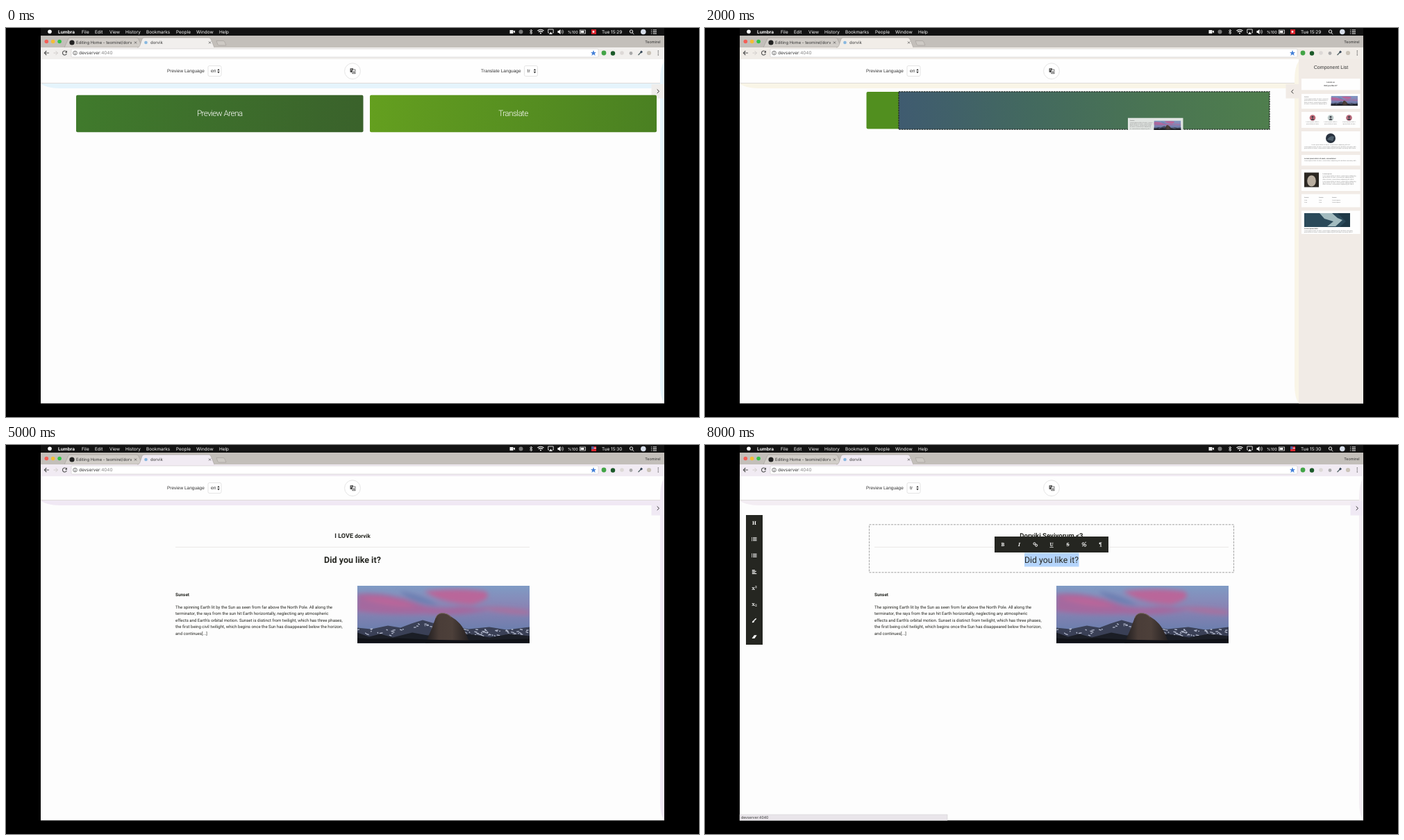
Animation of 998x561 px, one loop 9 s. Source, as an HTML page:

```html
<!DOCTYPE html>
<html lang="en">
<head>
<meta charset="utf-8">
<title>Page builder demo</title>
<style>
  html, body { margin: 0; height: 100%; overflow: hidden; background: #000; }
  svg { display: block; width: 100vw; height: 100vh; }
  text { font-family: "Liberation Sans", Arial, sans-serif; text-rendering: geometricPrecision; white-space: pre; }
  .ui { font-family: Inter, sans-serif; }
  .doc { font-family: Roboto, sans-serif; }
  .thin { font-family: Roboto, sans-serif; font-weight: 300; letter-spacing: -.6px; }
  .icon { font-family: "Noto Serif", serif; font-weight: 700; }
  .mid { text-anchor: middle; }
  .b { font-weight: 700; }
</style>
</head>
<body>
<svg id="stage" viewBox="0 0 998 561" preserveAspectRatio="none">
  <defs>
    <linearGradient id="forest"><stop stop-color="#407a2c"/><stop offset="1" stop-color="#3a622b"/></linearGradient>
    <linearGradient id="lime"><stop stop-color="#649f1f"/><stop offset="1" stop-color="#4a8022"/></linearGradient>
    <linearGradient id="arena"><stop stop-color="#54931f"/><stop offset="1" stop-color="#3d6b2a"/></linearGradient>
    <linearGradient id="drop"><stop stop-color="#3f5b70"/><stop offset=".35" stop-color="#43695f"/><stop offset=".7" stop-color="#4a7552"/><stop offset="1" stop-color="#4f7e4d"/></linearGradient>
    <linearGradient id="sky" x2="0" y2="1"><stop stop-color="#7f9bc4"/><stop offset=".4" stop-color="#8a82b3"/><stop offset=".75" stop-color="#6d7fae"/></linearGradient>
    <linearGradient id="dome"><stop stop-color="#1d1b1d"/><stop offset=".3" stop-color="#4a3d38"/><stop offset=".6" stop-color="#4d403a"/><stop offset="1" stop-color="#231f20"/></linearGradient>
    <filter id="soft"><feGaussianBlur stdDeviation="3"/></filter>
    <symbol id="photo" viewBox="0 0 248 82" preserveAspectRatio="none">
      <path fill="url(#sky)" d="M0 0H248V82H0Z"/>
      <g filter="url(#soft)">
        <path fill="#a4699f" d="M0 12Q40 8 84 24Q110 36 150 30L190 34Q150 44 96 40Q40 42 0 36Z"/>
        <path fill="#b9669a" d="M4 17Q40 12 86 29Q50 33 4 17ZM96 8Q145 2 184 8Q198 18 165 27Q120 25 96 8Z"/>
        <path fill="#a8719f" d="M176 31Q215 30 248 36V41Q205 41 176 31Z"/>
        <path fill="#6c7fb2" d="M60 8Q92 12 118 29Q82 27 60 8Z"/>
      </g>
      <path fill="#3a4056" d="M0 60L20 62 44 57 62 60 78 54 94 49 108 53 160 62 190 59 215 63 248 59V82H0Z"/>
      <g id="snow" fill="none" stroke="#b4bace" stroke-width="1.3"></g>
      <path fill="#1b1e26" d="M0 67L17 73 33 69 51 74 79 67 101 71 161 69 191 74 219 69 248 72V82H0Z"/>
      <path fill="url(#dome)" d="M98 82L106 64 112 48Q114 40 121 39Q129 38 136 45Q150 53 156 68L162 82Z"/>
      <path fill="none" stroke="#85756b" stroke-width=".8" d="M113 46Q115 40 121 39.4Q129 38.6 135 45"/>
      <path fill="#101217" d="M0 75Q32 77 58 75L105 77 160 78 248 76V82H0Z"/>
    </symbol>
  </defs>
  <g id="scene"></g>
</svg>
<script>
const BRAND = 'dorvik', USER = 'Teomirel', HOST = 'devserver', PORT = ':4040';
const INK = '#252621', BOTTOM = 541.4;
const TITLE = `<tspan font-size="9.1">I LOVE </tspan><tspan font-size="8">${BRAND}</tspan>`;
const TITLE_TR = '<tspan font-size="9.6">Dorviki Seviyorum &lt;3</tspan>';
const WIDE = ['The spinning Earth lit by the Sun as seen from far above the North Pole. All along the',
  'terminator, the rays from the sun hit Earth horizontally, neglecting any atmospheric',
  "effects and Earth's orbital motion. Sunset is distinct from twilight, which has three phases,",
  'the first being civil twilight, which begins once the Sun has disappeared below the horizon,',
  'and continues[...]'];
const NARROW = ['The spinning Earth lit by the Sun as seen from far above the North',
  'Pole. All along the terminator, the rays from the sun hit Earth',
  "horizontally, neglecting any atmospheric effects and Earth's orbital",
  'motion. Sunset is distinct from twilight, which has three phases, the',
  'first being civil twilight, which begins once the Sun has disappeared',
  'below the horizon, and continues[...]'];

const rect = (x, y, w, h, fill, more = '') => `<rect x="${x}" y="${y}" width="${w}" height="${h}" fill="${fill}" ${more}/>`;
const dot = (x, y, r, fill, more = '') => `<circle cx="${x}" cy="${y}" r="${r}" fill="${fill}" ${more}/>`;
const text = (x, y, size, str, cls = '', fill = '#333', more = '') =>
  `<text x="${x}" y="${y}" font-size="${size}" class="${cls}" fill="${fill}" ${more}>${str}</text>`;
const line = (d, color, w = 1, more = '') => `<path d="${d}" fill="none" stroke="${color}" stroke-width="${w}" ${more}/>`;
const shape = (d, fill) => `<path d="${d}" fill="${fill}"/>`;
const photo = (x, y, w, h) => `<use href="#photo" x="${x}" y="${y}" width="${w}" height="${h}"/>`;

function menuBar(late) {
  const items = [[109, 'File'], [128, 'Edit'], [149, 'View'], [172, 'History'], [202, 'Bookmarks'],
    [245, 'People'], [274, 'Window'], [307, 'Help']];
  return rect(50, 0, 898, 11, '#131313') + dot(63, 5.3, 2.8, '#fff') +
    text(75, 7.7, 6.5, 'Lumbra', 'ui b', '#fff') +
    items.map(([x, s]) => text(x, 7.7, 6.45, s, 'ui', '#fff')).join('') +
    rect(725.5, 3, 5, 5, '#eee') + shape('M730 5L733 3.5V7.5Z', '#eee') +
    dot(741.5, 5.5, 3, '#777') +
    line('M754 3.5L758 7 756 9V2L758 4 754 7.5', '#eee', .8) +
    line('M765.5 4Q770 .5 774.5 4M767 5.8Q770 3.4 773 5.8', '#fff', 1.2) + dot(770, 7.6, 1, '#fff') +
    line('M782 7H780.8V2H788.2V7H787', '#eee', .9) + shape('M784.5 5.5L787 9H782Z', '#eee') +
    shape('M794.5 4H796L798.5 2V9L796 7H794.5Z', '#fff') + line('M800 3.5Q801.5 5.5 800 7.5M801.5 2.5Q804 5.5 801.5 8.5', '#eee', .7) +
    text(809, 7.5, 5.6, '%100', 'ui', '#fff') +
    rect(826.5, 3, 8, 5, 'none', 'stroke="#eee" stroke-width=".8"') + rect(827.5, 4, 5, 3, '#eee') +
    rect(843, 2, 7, 7, '#d8242e') + (late ? rect(843, 2, 3.5, 4, '#4b5f9b') + rect(846.5, 4, 3.5, 1, '#eee') : dot(846, 5.5, 1.4, '#fff')) +
    text(858, 7.7, 6.45, late ? 'Tue 15:30' : 'Tue 15:29', 'ui', '#fff') +
    dot(900.5, 5, 2.2, 'none', 'stroke="#fff" stroke-width=".9"') + line('M902 6.8L904.3 9', '#fff', .9) +
    dot(917.8, 5.5, 3.8, '#d5dce8') +
    line('M929 3H930M929 5.5H930M929 8H930M931.5 3H937M931.5 5.5H937M931.5 8H937', '#fff', 1);
}

function browser(s) {
  const close = x => line(`M${x - 1.5} 19.5l3 3m0 -3l-3 3`, '#555', .8);
  return rect(50, 11, 898, 18, '#c3bfba') +
    ['#f45f57', '#f4bd35', '#30c545'].map((c, i) => dot(58.3 + i * 9.4, 19.5, 2.8, c)).join('') +
    `<path d="M84 28L90 15Q91 14 92 14H188Q190 14 191 16L196 28Z" fill="#d2cec9" stroke="#a19d99" stroke-width=".6"/>` +
    `<path d="M303 18.5H313Q314 18.5 315 20L317 25H307Q305.5 25 305 24Z" fill="#cdc9c4" stroke="#a19d99" stroke-width=".6"/>` +
    rect(50, 28, 898, 17, s.bar) +
    `<path d="M189 28.2Q192 28 193 25L196 16Q197 14 199 14H292Q294 14 295 16L300 28.2" fill="${s.bar}" stroke="#a19d99" stroke-width=".5"/>` +
    dot(95, 21, 3.6, '#222') +
    `<svg x="101" y="14" width="80" height="14">${text(0, 9.2, 5.9, `Editing Home - ${USER.toLowerCase()}/${BRAND}`, 'ui')}</svg>` +
    close(186.5) + dot(201.5, 21, 2.3, '#88b8e0') + text(208, 23.2, 6, BRAND, 'ui') + close(293.5) +
    text(942.5, 22, 5.5, USER, 'ui', '#333', 'text-anchor="end"') +
    line('M62 36H55.5M58.3 33L55.3 36 58.3 39', '#555', 1.1) +
    line('M68.5 36H74.5M71.5 33L74.5 36 71.5 39', '#d0ccca', 1) +
    line('M87 34.4A3 3 0 1 0 87.3 37', '#555', 1.1) + shape('M88 32.5V35.8H84.8Z', '#555') +
    rect(94, 30, 759, 12, '#fff', 'rx="1.5" stroke="#cfcbc9" stroke-width=".6"') +
    dot(99.5, 36, 2.8, 'none', 'stroke="#555" stroke-width=".8"') + line('M99.5 34.2V34.9M99.5 35.5V37.8', '#555', .8) +
    text(105, 38.4, 6.4, `${HOST}<tspan fill="#888">${PORT}</tspan>`, 'ui') +
    shape('M846 32L847.2 35H850L847.8 36.8 848.7 40 846 38.1 843.3 40 844.2 36.8 842 35H844.8Z', '#4681d8') +
    dot(861, 36, 3.4, '#43a547') + dot(874, 36.5, 3.2, '#1c5a2a') + dot(887, 36, 2.8, '#ddd9d7') +
    dot(900, 36.5, 2.4, '#aaa') + line('M910.5 39L914.5 35', '#566', 1.4) + line('M914 33.5L916 35.5', '#345', 2.8) +
    dot(926, 36, 3.1, '#cbc4b9') + [33.3, 36, 38.7].map(y => dot(939.3, y, .8, '#555')).join('');
}

function select(x, label) {
  const a = x + 15;
  return rect(x, 54.5, 19, 15, '#fff', 'rx="2" stroke="#ddd" stroke-width=".8"') +
    text(x + 4, 64.4, 6.8, label) +
    shape(`M${a - 1.7} 61.3l1.7 -2.6 1.7 2.6ZM${a - 1.7} 62.8l1.7 2.6 1.7 -2.6Z`, '#333');
}

function header(s) {
  return rect(50, 45, 898, 34.5, '#fefefe') + rect(50, 79, 898, 1, '#dedbd9') +
    text(232, 64, 6.5, 'Preview Language') + select(291, s.lang || 'en') +
    (s.split ? text(684, 64, 6.5, 'Translate Language') + select(746.5, 'tr') : '') +
    dot(499, 62.2, 11.4, '#fff', 'stroke="#ddd" stroke-width=".8"') +
    rect(495.6, 58.3, 4.4, 5.4, '#333') + rect(498.8, 60, 4.2, 5.8, '#fff', 'stroke="#444" stroke-width=".7"') +
    text(499.4, 64.6, 4.2, 'A', 'b') + line('M496.4 60h2m-1 -.9v.9q0 1.4 -1 2.2', '#fff', .5);
}

function frameTint(s) {
  const r = s.panel ? 855 : 948, c = s.tint;
  return shape(`M50 80Q58 87 77 87H${r}V80Z`, c) +
    shape(`M${r} 48Q${r - 6} 56 ${r - 6} 76V515Q${r - 6} 533 ${r} 541Z`, c) +
    rect(r - 18.5, 81, 18.5, 20.5, s.side) +
    line(s.panel ? 'M847.3 89L844.5 91.7 847.3 94.5' : 'M937.7 88.5L940.5 91.3 937.7 94', '#333', 1);
}

const LOREM = 'Lorem ipsum dolor sit amet, consectetuer adipiscing elit sed diam nonummy nibh euismod tincidunt ut laoreet';
const tiny = (x, y, n, rows = 1, cls = '') => Array.from({length: rows}, (_, i) =>
  text(x, y + i * 2.3, 2.1, LOREM.slice(i * 6, i * 6 + n).trim(), cls, '#777')).join('');

function panel(s) {
  const cards = [[73, 16.5], [95, 21.5], [121, 23], [149, 29], [183, 15.5], [204, 31], [239.5, 19], [263.5, 33.5]];
  return rect(855, 45, 93, BOTTOM - 45, s.side) + text(901.5, 59.3, 7.1, 'Component List', 'mid') +
    cards.map(([y, h]) => rect(859, y, 84.5, h, '#fefefe')).join('') +
    text(901, 78.8, 2.6, 'Lorem us', 'mid b') + text(901, 84, 2.7, 'Did you like it?', 'mid b') +
    tiny(863, 100.3, 5, 1, 'b') + tiny(863, 103, 36, 4) + photo(901.5, 98, 38.5, 14) +
    [875, 901, 927.5].map((x, i) => dot(x, 129.5, 4.3, ['#bf6977', '#bccac9', '#b6697a'][i]) +
      dot(x, 128.3, 1.4, '#3e3f48') + shape(`M${x - 2.6} 132.8Q${x} 128 ${x + 2.6} 132.8Z`, '#3e3f48') +
      tiny(x, 136.3, 19, 2, 'mid')).join('') +
    dot(901, 159, 7, '#28323f') + shape('M896 161Q901 154 906 157L904 163Z', '#50606d') + tiny(901, 169, 60, 1, 'mid') + tiny(863, 171.5, 78, 2) +
    text(863, 188.8, 2.3, LOREM.slice(0, 40), 'b') + tiny(863, 191.8, 78) +
    rect(863, 208.5, 21, 21, '#2b2722') + '<ellipse cx="873.5" cy="220.5" rx="6.3" ry="8" fill="#b9aea0"/>' +
    tiny(889.5, 211, 12, 1, 'b') + tiny(889.5, 214, 51, 3) + tiny(889.5, 221.5, 51, 3) +
    [863, 884, 903].map(x => tiny(x, 245, 5, 1, 'b') + [248.5, 251.5].map(y => tiny(x, y, x > 900 ? 11 : 4)).join('')).join('') +
    rect(863, 267, 66, 20, '#2b4a5a') + shape('M885 267H903L911 274 918 277 908 286H896L905 279 892 275Z', '#a3bcc0') + shape('M911 267H929V287H914L923 279Z', '#1f3947') +
    text(863, 290, 2.2, LOREM.slice(0, 17), 'b') + tiny(863, 292.6, 74, 2);
}

const bar = (x, y, w, fill, label) => rect(x, y, w, 53.5, fill, 'rx="2"') +
  text(x + w / 2, y + 30.5, 11.8, label, 'thin mid', '#fff');

function article(x, w, y, lines, title, plain) {
  const c = x + w / 2, pw = w / 2 - 7;
  return text(c, 134 + y, 9, title, 'doc b mid', INK) + rect(x, 146.8 + y, w, .8, '#e3e1df') +
    (plain ? rect(460, 155.5, 78.5, 20, '#b4d4fb') : '') +
    text(c, 170.4 + y, plain ? 12.3 : 12.5, 'Did you like it?', 'doc mid' + (plain ? '' : ' b'), INK) +
    text(x, 218.2 + y, 6.4, 'Sunset', 'doc b', INK) +
    lines.map((s, i) => text(x, 236.1 + y + i * 9.35, 6.05, s, 'doc', INK)).join('') +
    photo(c + 7, 203 + y, pw, pw / 3);
}

const glyph = (x, y, s, more = '') => text(x, y + 2.5, 7.2, s, 'icon mid', '#fff', more);
const dashed = (x, y, w, h) => rect(x, y, w, h, 'none', 'stroke="#999" stroke-width=".9" stroke-dasharray="3 1.5"');

function inlineTools(x, y) {
  const at = i => x + 12 + i * 23.4, m = y + 11.5;
  const link = i => dot(at(i) - 1.4, m - 1.2, 1.5, 'none', 'stroke="#fff" stroke-width="1"') +
    dot(at(i) + 1.4, m + 1.2, 1.5, 'none', 'stroke="#fff" stroke-width="1"');
  return rect(x, y, 164, 23, INK) + glyph(at(0), m, 'B') + glyph(at(1), m, 'I', 'font-style="italic"') + link(2) +
    glyph(at(3), m, 'U', 'text-decoration="underline"') + glyph(at(4), m, 'S', 'text-decoration="line-through"') +
    link(5) + line(`M${at(5) - 3} ${m + 2.5}l2 -1m2 -4l2 -1`, '#fff', .8) + glyph(at(6), m, '¶');
}

function sideTools() {
  const y = i => 112.8 + i * 23.4;
  const rows = (i, d) => line(d.map((w, k) => `M69 ${y(i) - 2.4 + k * 2}h${w}`).join(''), '#fff', 1.1);
  const marks = i => line(`M67.5 ${y(i) - 3}v6`, '#fff', 1, 'stroke-dasharray="1.2 .8"');
  return rect(59, 101, 24, 187, INK) + glyph(71, y(0), 'H') +
    rows(1, [5.5, 5.5, 5.5]) + marks(1) + rows(2, [5.5, 5.5, 5.5]) + marks(2) +
    line(`M67.8 ${y(3) - 2.5}h4m-4 1.7h6m-6 1.7h4.5m-4.5 1.7h6.5`, '#fff', 1) +
    glyph(71, y(4), 'x²') + glyph(71, y(5), 'x₂') +
    line(`M70.5 ${y(6)}l3.2 -3`, '#fff', 1.5) + shape(`M67.8 ${y(6) + 3}q.5 -3.6 2.5 -3.3 2 1.4 -.4 3Z`, '#fff') +
    shape(`M67.5 ${y(7) + 2.3}l3.4 -4.6h3.8l-3.4 4.6Z`, '#fff');
}

const emptySplit = () => bar(101, 96.8, 413.5, 'url(#forest)', 'Preview Arena') + bar(524, 96.8, 413, 'url(#lime)', 'Translate');
const emptyArena = () => bar(232.5, 92, 533, 'url(#arena)', 'Preview Arena');

const dragging = () => rect(232.5, 92, 60, 53.5, '#518f1f', 'rx="2"') +
  rect(279, 91.8, 534, 54.4, 'url(#drop)', 'stroke="#252c28" stroke-width="1.3" stroke-dasharray="2.4 1.2"') +
  `<svg x="609" y="129.5" width="79.5" height="17.5">${rect(0, 0, 80, 18, '#e1e5e2')}` +
  `${tiny(3, 4, 5, 1, 'b')}${tiny(3, 7, 34, 5)}${photo(37.5, 4, 39, 13.5)}</svg>`;

const translating = () => article(113, 390, 4.6, NARROW, TITLE) + article(535, 390, 4.6, NARROW, TITLE_TR) +
  dashed(528.5, 119.8, 403.5, 69) + inlineTools(648, 104) + sideTools() +
  rect(506, 120, 19, 18.5, '#333430') + rect(513, 127, 4.6, 5, 'none', 'stroke="#fff" stroke-width=".9"') +
  line('M512 126h6.5M514.5 125h1.6M514.5 128v3M516.2 128v3', '#fff', .7) +
  line('M684 140.7H715', '#d65a50', 1, 'stroke-dasharray="1 1"') + line('M776.4 127.5V142', '#222', .8);

const popup = () => rect(282.5, 54, 30, 26.5, '#f5f3f5', 'rx="2.5" stroke="#bbb" stroke-width=".6"') +
  text(295, 64.4, 6.8, 'en') + line('M286 62.3l1.4 1.7 2.5 -3.8', '#333', .8) +
  rect(282.8, 68, 29.4, 10, '#3f86f2') + text(295, 75.3, 6.8, 'tr', '', '#fff');

const preview = title => article(244, 510, 0, WIDE, title);
const editing = () => article(244, 510, 0, WIDE, TITLE_TR, true) + dashed(236.5, 114.8, 525, 69) +
  inlineTools(417, 132) + sideTools() + rect(50, 533, 299, BOTTOM - 533, '#e9e5ea', 'stroke="#ccc" stroke-width=".5"') +
  text(52, 539.3, 5.2, HOST + PORT, 'ui');

const blue = {tint: '#e5f4fc', side: '#efedeb', bar: '#f1efed'};
const cream = {tint: '#f9f5e7', side: '#f1ebe6', bar: '#f1ede8'};
const lilac = {tint: '#f0e8f4', side: '#f0e9f4', bar: '#f1ebf3', late: true};

// One scene per second
const SCENES = [
  {...blue, split: true, body: emptySplit},
  {...cream, panel: true, body: emptyArena},
  {...cream, panel: true, body: dragging},
  {...lilac, panel: true, body: () => preview(TITLE)},
  {...lilac, split: true, body: translating},
  {...lilac, body: () => preview(TITLE)},
  {...lilac, body: () => preview(TITLE) + popup()},
  {...lilac, lang: 'tr', body: () => preview(TITLE_TR)},
  {...lilac, tint: '#f3edf3', lang: 'tr', body: editing}
];

const draw = s => rect(50, 45, 898, BOTTOM - 45, '#fdfdfd') + menuBar(s.late) + browser(s) + header(s) +
  frameTint(s) + (s.panel ? panel(s) : '') + s.body();

// Snow flecks along the ridge, from a fixed seed
let seed = 7;
const random = () => (seed = seed * 16807 % 2147483647) / 2147483647;
const flecks = Array.from({length: 90}, () => {
  const x = random() * 244;
  const ridge = 62 - 9 * Math.exp(-(((x - 92) / 22) ** 2));
  return `M${x.toFixed(1)} ${(ridge + random() * 9).toFixed(1)}l${(1 + random() * 4).toFixed(1)} ${(random() * 3 - 1).toFixed(1)}`;
});
document.getElementById('snow').innerHTML = `<path d="${flecks.join('')}"/>`;

const scene = document.getElementById('scene');
const start = performance.now();
let shown = -1;
function tick() {
  const i = Math.floor((performance.now() - start) / 1000) % SCENES.length;
  if (i !== shown) scene.innerHTML = draw(SCENES[shown = i]);
  requestAnimationFrame(tick);
}
tick();
</script>
</body>
</html>
```
